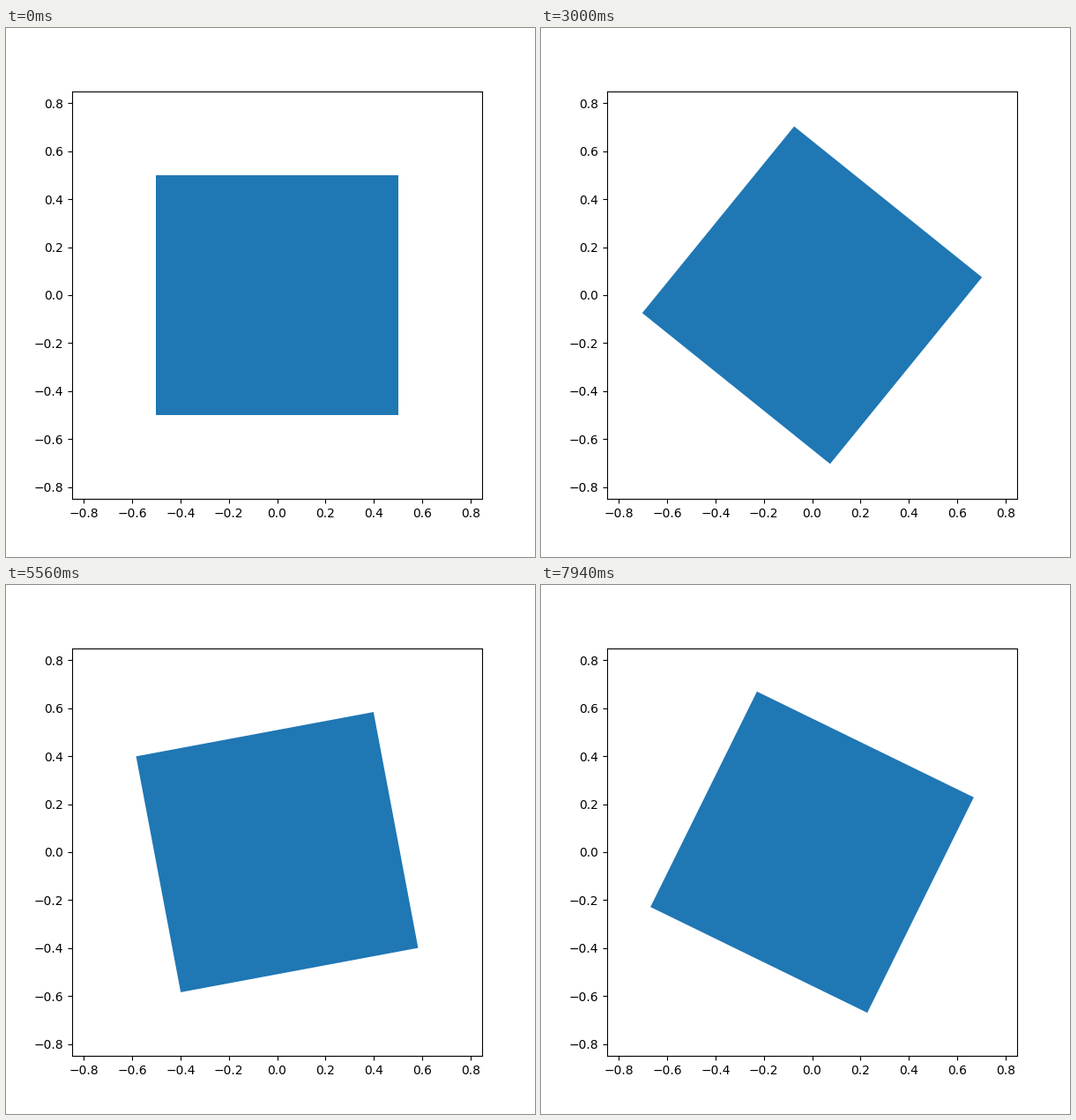
Write a matplotlib script that moves like this. It is 600x600 px and loops after 8 s.

```python
import numpy as np
import matplotlib.pyplot as plt
from matplotlib.animation import FuncAnimation
from matplotlib.patches import Polygon

TICK = 20            # ms per drawn frame
LOOP = 8000          # ms per loop
HOLD = 480           # ms before the turning starts
STEP = 2 * np.pi / 499

SQUARE = 0.5 * np.array([[-1, -1], [1, -1], [1, 1], [-1, 1]])
LIMIT = 1.2 * np.sqrt(0.5)

fig, ax = plt.subplots(figsize=(6, 6), dpi=100)
ax.set_xlim(-LIMIT, LIMIT)
ax.set_ylim(-LIMIT, LIMIT)
patch = ax.add_patch(Polygon(SQUARE, closed=True, facecolor="#1f77b4"))


def step_at(ms):
    """Steps come in threes lasting 20, 20 and 100 ms."""
    group, rest = divmod(max(ms - HOLD, 0), 140)
    return 3 * group + min(rest // 20, 2)


def turned(angle):
    """The square turned clockwise."""
    c, s = np.cos(angle), np.sin(angle)
    return SQUARE @ np.array([[c, -s], [s, c]])


def update(frame):
    patch.set_xy(turned(STEP * step_at(frame * TICK)))
    return (patch,)


def init():
    return update(0)


anim = FuncAnimation(fig, update, frames=LOOP // TICK, init_func=init,
                     interval=TICK, blit=True, repeat=True, repeat_delay=0)
plt.show()
```
